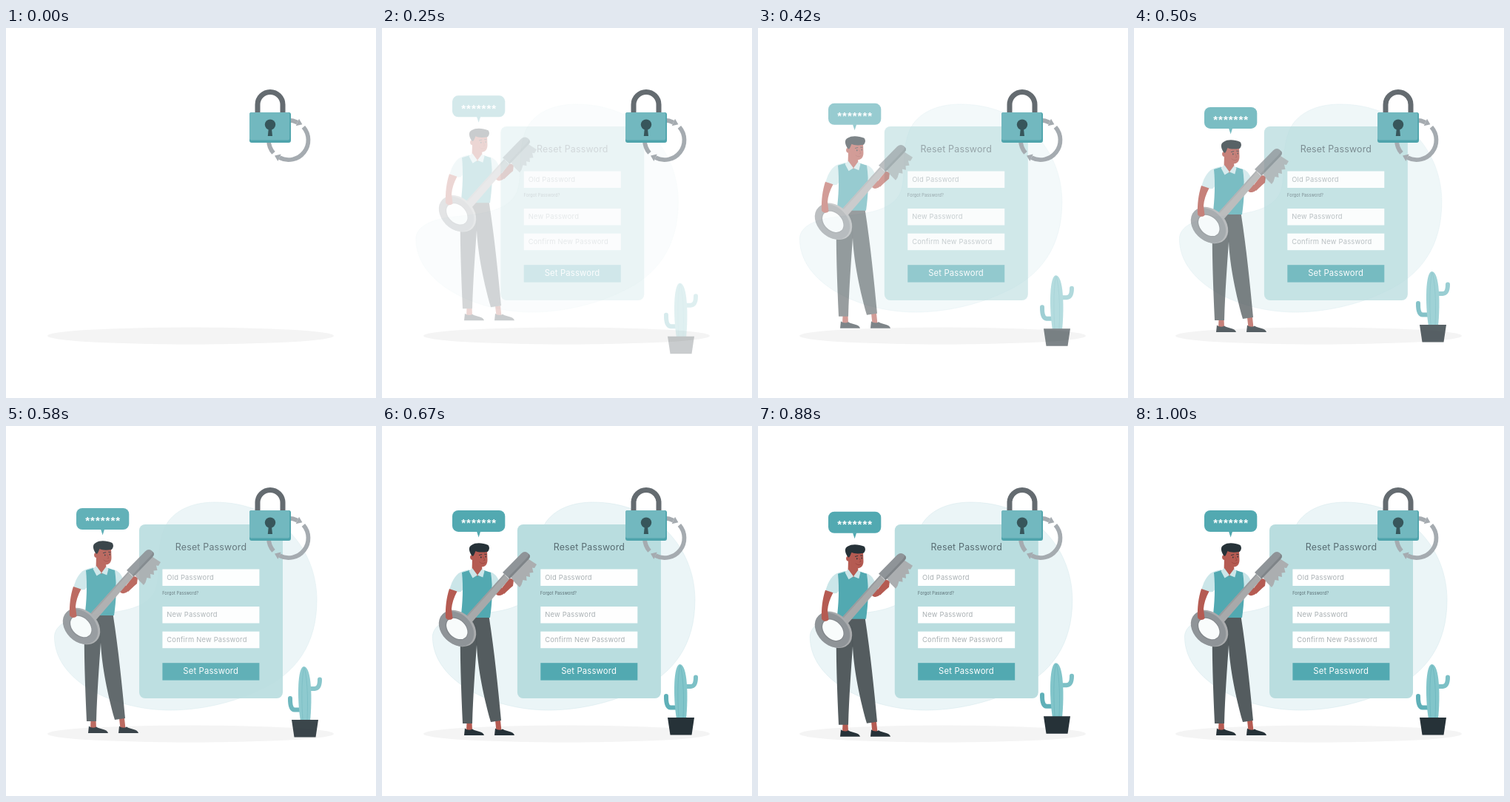
Recreate the animation shown at these times as an HTML page. Size 500 px wide and 500 px high, loop 1040 ms.

```html
<!DOCTYPE html>
<html lang="en">
<head>
<meta charset="utf-8">
<title>Reset password</title>
<style>
  html, body { margin: 0; width: 100%; height: 100%; overflow: hidden; background: #fff; }
  svg { display: block; width: 100%; height: 100%; }
  text { font-family: Inter, Roboto, sans-serif; }
  .label { font-size: 9.4px; letter-spacing: .2px; fill: #a9b0b3; }
  .skin { fill: #b55b52; }
  .teal { fill: #52a9b1; }
  .dark { fill: #263238; }
  .pale { fill: #cbe6e9; }
  .line { fill: none; stroke-linecap: round; stroke-linejoin: round; }
  .stars { font: bold 15px 'Liberation Sans', Arial, sans-serif; letter-spacing: 1px; }
</style>
</head>
<body>
<svg viewBox="0 0 500 500">
  <ellipse cx="249.5" cy="416" rx="193.5" ry="11.5" fill="#f4f4f4"/>

  <g data-from="-30 0">
    <path fill="#ebf5f7" stroke="#d3e7ea" stroke-width=".5" d="M68.5 285C68.5 268 90 258 120 255C160 251 200 247 207 215C212 190 206 165 217 138C228 114 255 103 285 103C370 103 423 165 423 235C423 295 395 335 345 357C310 374 265 384 225 384C150 384 68.5 345 68.5 285Z"/>
  </g>

  <g data-from="-30 0">
    <rect x="183" y="133" width="194" height="235" rx="8" fill="#b9dddf"/>
    <g fill="#fff">
      <rect x="214.4" y="193.5" width="131" height="22.5"/>
      <rect x="214.4" y="244" width="131" height="22.5"/>
      <rect x="214.4" y="277.7" width="131" height="22.5"/>
    </g>
    <rect class="teal" x="214.4" y="320.2" width="131" height="23.4"/>
    <text x="280" y="168.2" font-size="12.4" letter-spacing=".2" text-anchor="middle" fill="#586c72">Reset Password</text>
    <text class="label" x="220.3" y="207.8">Old Password</text>
    <text x="214.2" y="228.4" font-size="5.6" letter-spacing=".1" fill="#586c72">Forgot Password?</text>
    <text class="label" x="220.3" y="258.3">New Password</text>
    <text class="label" x="220.3" y="292">Confirm New Password</text>
    <text x="279.7" y="335.3" font-size="11.3" letter-spacing=".15" text-anchor="middle" fill="#fff">Set Password</text>
  </g>

  <g data-from="0 -30">
    <!-- speech bubble -->
    <rect class="teal" x="95" y="114" width="71.3" height="29" rx="8"/>
    <path class="teal" d="M128 142.5H133.2L130.6 150.5Z"/>
    <text class="stars" x="131.2" y="136.2" text-anchor="middle" fill="#fff">*******</text>

    <!-- legs and shoes -->
    <path class="skin" d="M114.5 400H121.5L122 412H114ZM153 398H160L161.5 412H154.5Z"/>
    <path class="dark" d="M112 408.5C115 411 119 411.5 122 409.5C127 413 137 412.5 138 418H111Z"/>
    <path class="dark" d="M153 408.5C156 411 160 411.5 163 409.5C168 413 178 412.5 179 418H152Z"/>
    <path fill="#545c5f" d="M106 257C105 310 107 355 109 402H122C123 365 126 325 128 296C129 320 135 358 147 400L161 398C157 355 152 305 144.5 257Z"/>
    <path class="line" stroke="#4a5256" stroke-width=".6" d="M128 296L127 270"/>

    <!-- far arm -->
    <path class="pale" d="M145 197C151 198 156 203 158 210L151 218L146 214Z"/>
    <path class="skin" d="M153.5 213L158.5 209.5L162 219L172 206L178 208L177 216L164 227C160 230 155 230 153.5 226Z"/>

    <!-- torso -->
    <path class="pale" d="M118 194L110 196C100 199 95 208 91.5 220C97 224 103 225 106.5 224L122 208Z"/>
    <path class="teal" d="M108 198L118 195H138L147 198C150 218 149 239 146 259H106.5C109 239 110 218 108 198Z"/>
    <path class="skin" d="M122 178L135 187L135.5 197L129 203L121.5 197Z"/>
    <path class="pale" d="M117.5 196L122 192L129 201.5L122.5 205.5ZM129 201.5L135.3 193L138.5 196L136.3 204.5Z"/>

    <!-- head -->
    <path class="skin" d="M121 167C130 163 139 164 142 168L142.5 181C142.5 189 137 192 131 189.5C127 188 124 186 122.5 181C118 181 118 174 122 174Z"/>
    <path class="dark" d="M120.5 174C117 168 117 163 121 161C127 157 136 158 143.5 161C146 164 145 168 142.5 170C136 171 130 171 126.5 169C125 172 124.5 175 122.5 176Z"/>
    <path class="line" stroke="#9b463f" stroke-width=".8" d="M136.8 177L139 181.6L137 182M132 184C134.5 186.5 137.5 186.4 139.5 184.6"/>
    <g class="dark"><ellipse cx="133.8" cy="177.5" rx=".8" ry="1.1"/><ellipse cx="140.2" cy="176.7" rx=".7" ry="1.1"/></g>
    <path class="line" stroke="#263238" stroke-width=".9" d="M131.4 174.6L134.8 173.7M138.6 173.3L141 173.5"/>

    <!-- key -->
    <path fill="#abaeb0" d="M174 204L197.5 179.5L209 187L206 192L203 191.5L204.5 198L199.5 198.5L200 204L195 203L195.5 209L190.5 208L188.5 214.5L186 218L179 211Z"/>
    <path fill="#a8a9aa" d="M110 261L165 200L172 207L119 268Z"/>
    <path fill="#989c9f" d="M110 261L165 200L166.3 201.3L111.4 262.2Z"/>
    <path fill="#8f9498" d="M163 198L188 172.5Q193 168 197.5 172Q202 176 198 180L172.5 206.5Z"/>
    <path fill="#7f8488" d="M170.5 204.7L195.5 178.5Q198.5 175.5 198.3 172.8Q201.8 176 198 180L172.5 206.5Z"/>
    <ellipse cx="102.5" cy="273.5" rx="28" ry="21" transform="rotate(45 102.5 273.5)" fill="#a9abad"/>
    <ellipse cx="100.5" cy="274" rx="27" ry="20" transform="rotate(45 100.5 274)" fill="#8f9498"/>
    <ellipse cx="101" cy="274" rx="17.5" ry="13" transform="rotate(45 101 274)" fill="#83888c"/>
    <ellipse cx="101.3" cy="274" rx="16.3" ry="11.7" transform="rotate(45 101.3 274)" fill="#f9fcfc"/>

    <!-- hands and near arm -->
    <path class="skin" d="M91 220L101.5 223.5C97 232 94.5 240 94 247L95.5 260C93 263 88 262.5 86 259C85.5 245 87 232 91 220Z"/>
    <path class="skin" d="M163 222L173.5 206.5C176 206 177.5 208 176 211L172 220L165 227Z"/>
  </g>

  <g data-from="0 30">
    <path class="line" stroke="#7cc0c6" stroke-width="6" d="M409 352H417C422 351.7 424 348 424 339.5"/>
    <path class="line" stroke="#5fb0b8" stroke-width="6" d="M397 380.5H390C385.5 380.2 383.8 375 384 365"/>
    <path fill="#82c5ca" d="M398 396C393 365 394 322 402.5 322C413 322 414 365 411 396Z"/>
    <path class="line" stroke="#6cb7be" stroke-width=".8" d="M402.3 324C399 345 399.5 372 401 394M403.5 324C408 345 408 372 407 394"/>
    <path class="dark" d="M386 394H422L418.5 417.5H389.5Z"/>
  </g>

  <!-- lock with two turning arrows -->
  <g id="arrow">
    <path fill="none" stroke="#a5abb0" stroke-width="5.8" d="M401.9 133.9A26.7 26.7 0 0 1 369.6 175.2"/>
    <path fill="#a5abb0" d="M363 172.6L367.4 180L371.7 170.6Z"/>
  </g>
  <use href="#arrow" transform="rotate(180 381.7 151.4)"/>
  <path fill="none" stroke="#646b70" stroke-width="7" d="M340 116V103.5A17 17 0 0 1 374 103.5V116"/>
  <rect x="329" y="114" width="56" height="41" rx="3" fill="#4fa4ac"/>
  <rect x="329" y="114" width="54.2" height="37.4" rx="2.5" fill="#72b8bf"/>
  <circle cx="357" cy="130.6" r="7.2" fill="#37565b"/>
  <path fill="#37565b" d="M355 134H358.8L360 146H353.8Z"/>
</svg>
<script>
const LOOP = 1040, FPS = 24;
const layers = [...document.querySelectorAll('[data-from]')].map(el => {
  const [dx, dy] = el.dataset.from.split(' ').map(Number);
  return { el, dx, dy };
});

const bez = (s, a, b) => 3 * (1 - s) * (1 - s) * s * a + 3 * (1 - s) * s * s * b + s * s * s;

// cubic-bezier(.36, -.01, .5, 1.38): overshoots, then settles
function ease(x) {
  if (x >= 1) return 1;
  let lo = 0, hi = 1;
  for (let i = 0; i < 30; i++) {
    const mid = (lo + hi) / 2;
    if (bez(mid, .36, .5) < x) lo = mid; else hi = mid;
  }
  return bez(lo, -.01, 1.38);
}

function draw(ms) {
  const step = Math.floor((ms % LOOP + 3.4) * FPS / 1000);
  const p = ease(step / FPS + .01);
  const alpha = step < 3 ? 0 : Math.min(1, p);
  for (const { el, dx, dy } of layers) {
    el.setAttribute('transform', `translate(${dx * (1 - p)} ${dy * (1 - p)})`);
    el.setAttribute('opacity', alpha);
  }
}

let start;
function tick(now) {
  start ??= now;
  draw(now - start);
  requestAnimationFrame(tick);
}
draw(0);
requestAnimationFrame(tick);
</script>
</body>
</html>
```
